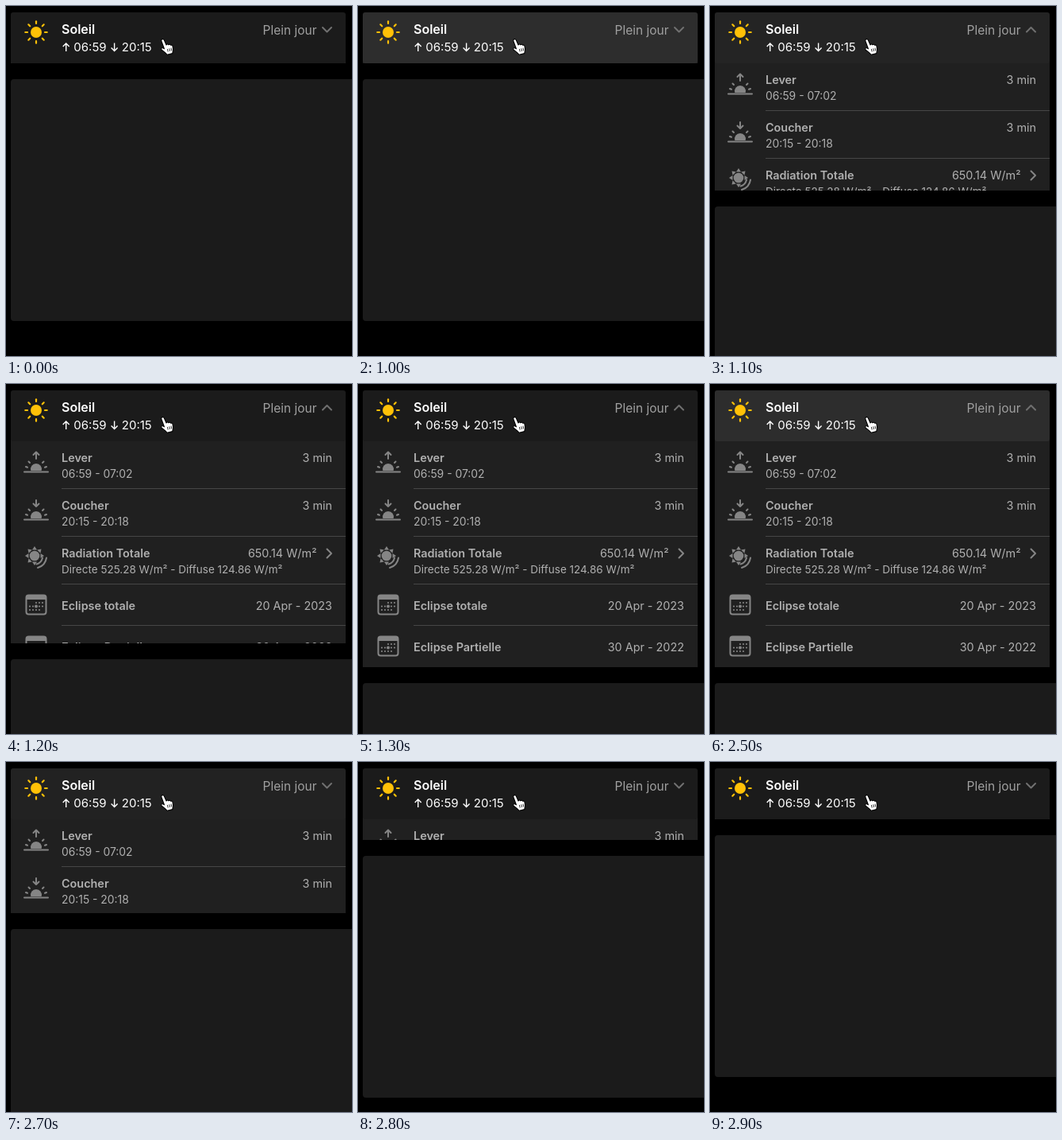
Animation, 436 px wide and 440 px high, one loop 4 s. Source, as an HTML page:

```html
<!DOCTYPE html>
<html lang="fr">
<head>
<meta charset="utf-8">
<title>Soleil</title>
<style>
html, body { margin: 0; width: 100%; height: 100%; overflow: hidden; background: #000; }
svg { display: block; }
text { font-family: Inter, "Open Sans", sans-serif; fill: #b0b0b0; }
.name { font-size: 14.4px; font-weight: 600; }
.sub { font-size: 13.9px; }
.value { font-size: 14.4px; text-anchor: end; }
.line { fill: none; stroke: #858585; stroke-width: 2; stroke-linecap: round; stroke-linejoin: round; }
.gray { fill: #858585; }
</style>
</head>
<body>
<svg width="436" height="440" viewBox="0 0 436 440">
  <defs>
    <clipPath id="clip"><rect id="window" x="6" y="8" width="422" height="64"/></clipPath>
    <g id="halfSun">
      <path class="gray" d="M31.3 109a7 7 0 1 1 13.4 0z"/>
      <path class="line" stroke-width="1.6" d="M23 110.5H53M25 104l2 .8M51 104l-2 .8M28.5 97.5l1.5 1.5M47.5 97.5l-1.5 1.5"/>
    </g>
    <g id="calendar">
      <rect class="line" x="25.5" y="265.5" width="25" height="24" rx="3"/>
      <path class="gray" d="M25 266h26v5H25z"/>
      <g id="dots" class="gray"></g>
    </g>
  </defs>

  <g clip-path="url(#clip)">
    <rect x="6" y="60" width="422" height="296" fill="#202020"/>
    <path d="M70 131.5H428M70 191.5H428M70 251.5H428M70 303.5H428" stroke="#464646"/>

    <use href="#halfSun"/>
    <path class="line" d="M38 94V86M34.5 89L38 85.5L41.5 89"/>
    <text class="name" x="70" y="98">Lever</text>
    <text class="sub" x="70" y="118">06:59 - 07:02</text>
    <text class="value" x="411" y="98">3 min</text>

    <use href="#halfSun" y="60"/>
    <path class="line" d="M38 146V154M34.5 150.5L38 154L41.5 150.5"/>
    <text class="name" x="70" y="158">Coucher</text>
    <text class="sub" x="70" y="178">20:15 - 20:18</text>
    <text class="value" x="411" y="158">3 min</text>

    <circle class="gray" cx="36" cy="216" r="6.3"/>
    <g id="spikes" class="gray"></g>
    <path class="line" stroke-width="2.4" d="M46 218.5a10.5 10.5 0 0 1-7.5 8M51 218.5a15.5 15.5 0 0 1-11 12.5"/>
    <text class="name" x="70" y="218">Radiation Totale</text>
    <text class="sub" x="70" y="238" style="font-size:13.5px">Directe 525.28 W/m² - Diffuse 124.86 W/m²</text>
    <text class="value" x="391.5" y="218">650.14 W/m²</text>
    <path class="line" d="M404.5 207.5l5.5 5.5l-5.5 5.5"/>

    <use href="#calendar"/>
    <text class="name" x="70" y="284">Eclipse totale</text>
    <text class="value" x="411" y="284">20 Apr - 2023</text>

    <use href="#calendar" y="52"/>
    <text class="name" x="70" y="336">Eclipse Partielle</text>
    <text class="value" x="411" y="336">30 Apr - 2022</text>
  </g>

  <rect id="header" x="6" y="8" width="422" height="64" rx="3"/>
  <circle cx="38" cy="33" r="7" fill="#ffc107"/>
  <g id="rays" stroke="#ffc107" stroke-width="2.2" stroke-linecap="round"></g>
  <text x="70" y="35" style="font-size:16px;font-weight:600;fill:#fff">Soleil</text>
  <g style="font-size:15px">
    <text x="85.3" y="57" style="fill:#fff">06:59</text>
    <text x="145.8" y="57" style="fill:#fff">20:15</text>
  </g>
  <path d="M75.7 57V47M71.7 51l4-4l4 4M136.6 46.5V56.5M132.6 52.5l4 4l4-4" fill="none" stroke="#fff" stroke-width="1.4"/>
  <text x="391.5" y="36" text-anchor="end" style="font-size:15.5px;fill:#a0a0a0">Plein jour</text>
  <path id="chevron" class="line" style="stroke:#707070"/>

  <rect id="panel" x="6" width="440" height="304" rx="4" fill="#1b1b1b"/>

  <path d="M196.2 42.2c1-1 2.6-.6 3.2.8l2.6 6c.4-1.2 2.2-1.4 2.9-.2c.8-.9 2.3-.6 2.7.5c1-.5 2.1 0 2.4 1.2c.6 2.4 1 4.600.2 6.600l-.4 2.500l-6.800 1.600c-1.600-2.500-4.600-4-7-6.200c-1-1.200.1-2.700 1.700-2.200l1.700 1l-3.500-9.600c-.3-.8-.2-1.500.3-2z"
        fill="#fff" stroke="#000" stroke-width="1.1" stroke-linejoin="round"/>
  <path d="M203.400 54l.8 3.500M205.700 53.400l.8 3.500M208 52.800l.6 3.500" stroke="#000" stroke-width=".8"/>
</svg>
<script>
const $ = id => document.getElementById(id);
const spokes = (draw, count) => Array.from({ length: count }, (_, i) => draw(i * 360 / count)).join('');

$('rays').innerHTML = spokes(a => `<path d="M38 22V19.300" transform="rotate(${a} 38 33)"/>`, 8);
$('spikes').innerHTML = spokes(a => a === 135 ? '' :
  `<path d="M33 208.500L36 204L39 208.500z" transform="rotate(${a} 36 216)"/>`, 8);

for (let row = 0; row < 3; row++) {
  for (let col = 0; col < 5; col++) {
    if ((row === 0 && col < 2) || (row === 2 && col > 3)) continue;
    const big = row === 1 && col === 2;
    $('dots').innerHTML += `<circle cx="${30 + col * 4}" cy="${275 + row * 4.500}" r="${big ? 2 : 1.100}"/>`;
  }
}

const LOOP = 4000, STEP = 100, CLOSED = 72, OPEN = 356;
const clamp = v => Math.min(1, Math.max(0, v));
const easeOut = (t, power) => 1 - (1 - clamp(t)) ** power;

function render(ms) {
  const t = Math.floor(ms % LOOP / STEP) * STEP;
  const shown = easeOut((t - 1000) / 300, 2.04) - easeOut((t - 2600) / 300, 2.17);
  const bottom = Math.round(CLOSED + (OPEN - CLOSED) * shown);
  const press = t < 1000 ? 0 : t < 2500 ? clamp((1200 - t) / 200) : clamp((2800 - t) / 250);
  const shade = Math.round(27 + 18 * press);
  const expanded = t > 1000 && t < 2600;

  $('window').setAttribute('height', bottom - 8);
  $('panel').setAttribute('y', bottom + 20);
  $('header').setAttribute('fill', `rgb(${shade},${shade},${shade})`);
  $('chevron').setAttribute('d', expanded ? 'M399 32.500l5.500-5.500l5.500 5.500' : 'M399 27l5.500 5.500l5.500-5.500');
}

const start = performance.now();
function tick() {
  render(performance.now() - start);
  requestAnimationFrame(tick);
}
tick();
</script>
</body>
</html>
```
